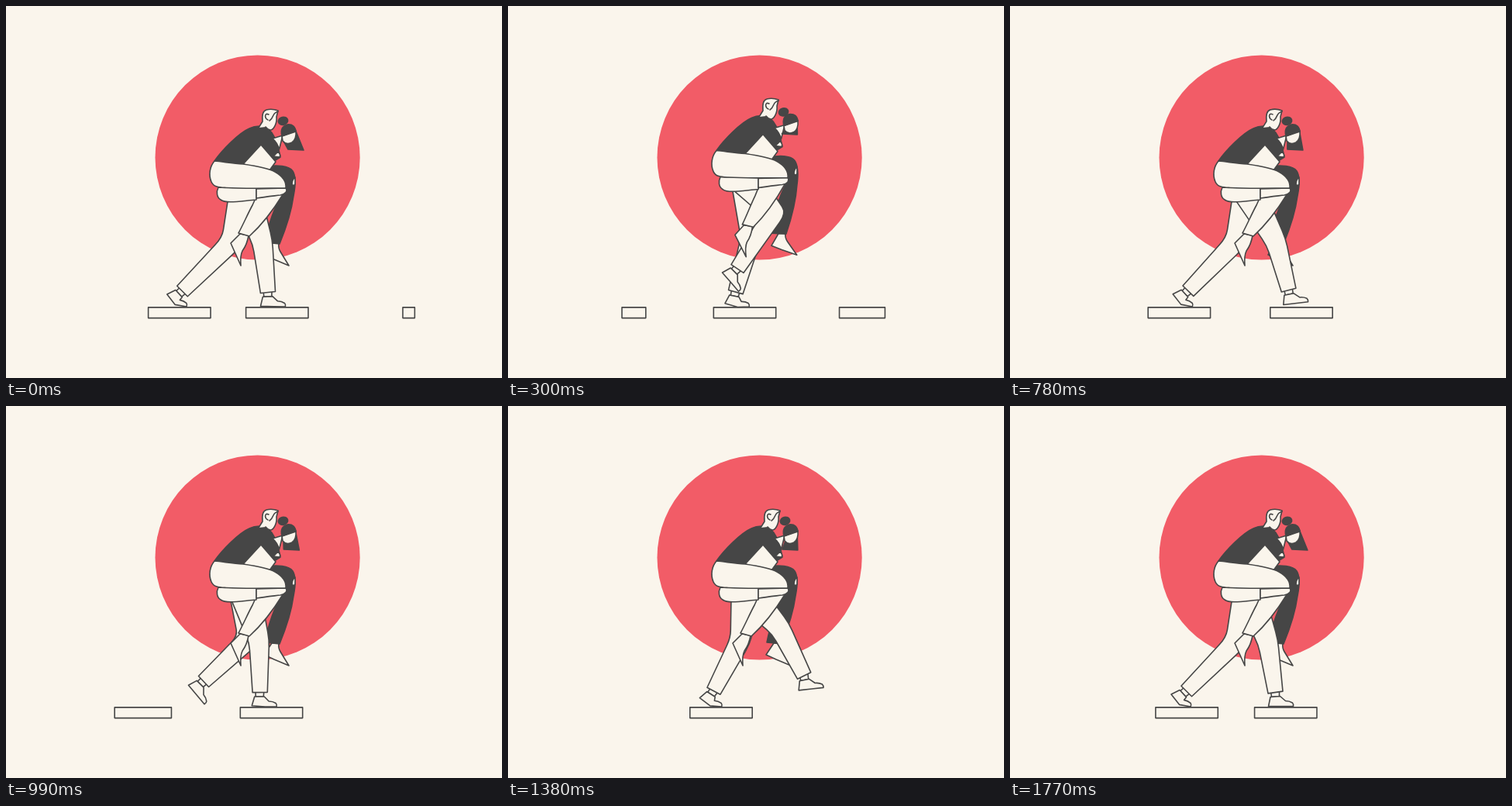
Animation of 640 by 480 pixels, one loop 1.8 s. Source, as an HTML page with a canvas:

```html
<!DOCTYPE html>
<html lang="en">
<head>
<meta charset="utf-8">
<title>Piggyback walk</title>
<style>
html, body { margin: 0; width: 100%; height: 100%; overflow: hidden; background: #faf5ec; }
canvas { display: block; width: 640px; height: 480px; }
</style>
</head>
<body>
<canvas id="stage" width="640" height="480"></canvas>
<script>
const ctx = document.getElementById('stage').getContext('2d');
const LOOP = 1800, STEP = 30, GROUND = 388, SLAB = 80.4;
const CREAM = '#faf5ec', RED = '#f25c67', DARK = '#464646';
const RAD = Math.PI / 180, TAU = Math.PI * 2;

function slope(keys, i, c) {
  const rate = (a, b) => (b[c] - a[c]) / (b[0] - a[0]);
  const p = keys[i - 1], k = keys[i], n = keys[i + 1];
  if (!p) return rate(k, n);
  if (!n) return rate(p, k);
  const a = rate(p, k), b = rate(k, n);
  if (a * b <= 0) return 0;
  const limit = 3 * Math.min(Math.abs(a), Math.abs(b));
  return Math.sign(a) * Math.min(Math.abs(rate(p, n)), limit);
}

// Smooth interpolation without overshoot; keys are [time, ...values].
function sample(keys, t) {
  let i = 0;
  while (i < keys.length - 2 && t >= keys[i + 1][0]) i++;
  const a = keys[i], b = keys[i + 1], d = b[0] - a[0], u = (t - a[0]) / d;
  const h = u * u * (3 - 2 * u);
  return a.slice(1).map((v, n) => {
    const c = n + 1;
    return v + (b[c] - v) * h + d * u * (1 - u) *
      ((1 - u) * slope(keys, i, c) - u * slope(keys, i + 1, c));
  });
}

// One stride: time, knee x and y, ankle x and y, foot angle.
const stride = [
  [0, 290.5, 305, 227.5, 368, 52],
  [110, 312, 302, 255, 355.5, 50],
  [300, 343, 268, 296, 339, 49],
  [570, 352, 296, 394.5, 352.5, -17],
  [650, 352, 303, 380.5, 359.5, -15],
  [890, 333, 305, 342.5, 369.5, 0],
  [1225, 313, 300, 293, 369, 17],
  [1510, 292, 305, 245.5, 367, 50]
];
const again = (k, d) => [k[0] + d, ...k.slice(1)];
const gait = [again(stride[stride.length - 1], -LOOP), ...stride,
              ...stride.slice(0, 2).map(k => again(k, LOOP))];
const FAR_LAG = 880;

// Each slab glides left, growing on entry and shrinking on exit.
const slabs = [
  { start: -352, grow: 300, end: 1247,
    path: [[-352, 431], [0, 349.8], [300, 305.5], [570, 257.2], [990, 176.8], [1247, 113.5]] },
  { start: -22, grow: 600, end: 2208,
    path: [[-30, 526], [300, 457], [570, 410], [1230, 303.3], [1530, 248.8], [1800, 223.8], [2208, 139]] }
];

const bob = (t, size, span) => t < span ? -size * (1 - Math.cos(TAU * t / span)) / 2 : 0;

function paint(path, fill) {
  const p = typeof path === 'string' ? new Path2D(path) : path;
  if (fill) { ctx.fillStyle = fill; ctx.fill(p); }
  ctx.stroke(p);
}

function poly(points, fill) {
  const p = new Path2D();
  points.forEach(q => p.lineTo(...q));
  p.closePath();
  paint(p, fill);
}

function moved(x, y, draw) {
  ctx.save();
  ctx.translate(x, y);
  draw();
  ctx.restore();
}

function turned(x, y, deg, draw) {
  ctx.save();
  ctx.translate(x, y);
  ctx.rotate(deg * RAD);
  ctx.translate(-x, -y);
  draw();
  ctx.restore();
}

function sun() {
  ctx.fillStyle = RED;
  ctx.beginPath();
  ctx.arc(324.6, 195.5, 132.1, 0, TAU);
  ctx.fill();
}

function slab({ start, grow, end, path }, t) {
  if (t <= start || t >= end) return;
  const w = SLAB * Math.min(1, Math.sqrt((t - start) / grow), (end - t) / 282);
  const l = sample(path, t)[0] - w / 2, r = l + w;
  poly([[l, 388.9], [r, 388.9], [r, 402.6], [l, 402.6]], CREAM);
}

function foot(x, y, deg) {
  const frame = (ox, oy, a) => (u, v) =>
    [ox + u * Math.cos(a) - v * Math.sin(a), oy + u * Math.sin(a) + v * Math.cos(a)];
  const at = frame(x, y, deg * RAD), ball = at(8, 18);
  // The toes flatten when they reach the ground.
  const room = Math.asin(Math.max(-1, Math.min(1, (GROUND - ball[1]) / 15)));
  const toe = frame(...ball, Math.min(deg * RAD, room));
  poly([at(-6, -2), at(-5, 6), at(5, 5), at(5, -2)], CREAM);
  const p = new Path2D();
  p.moveTo(...at(-6.5, 6));
  p.lineTo(...at(-9, 18));
  p.lineTo(...ball);
  p.lineTo(...toe(15, 0));
  p.quadraticCurveTo(...toe(15.5, -3), ...toe(14, -4.5));
  p.quadraticCurveTo(...toe(10, -7), ...toe(5, -7));
  p.lineTo(...at(6, 5));
  p.closePath();
  paint(p, CREAM);
}

function leg(t, lift) {
  const [kx, ky, ax, ay, deg] = sample(gait, t);
  const hx = 308, hy = 240 + lift;
  const thigh = Math.atan2(ky - hy, kx - hx), calf = Math.atan2(ay - ky, ax - kx);
  const bend = (calf - thigh) / 2;
  const off = (x, y, a, w) => [x - Math.sin(a) * w, y + Math.cos(a) * w];
  const mix = (a, b, u) => [a[0] + (b[0] - a[0]) * u, a[1] + (b[1] - a[1]) * u];
  foot(ax, ay, deg);
  const p = new Path2D();
  for (const s of [1, -1]) {
    const edge = [off(hx, hy, thigh, 20 * s), off(kx, ky, thigh + bend, 12.9 * s / Math.cos(bend)),
                  off(ax, ay, calf, 9.6 * s)];
    if (s < 0) edge.reverse();
    const [a, k, b] = edge;
    p.lineTo(...a);
    p.lineTo(...mix(k, a, 0.15));
    p.quadraticCurveTo(...k, ...mix(k, b, 0.15));
    p.lineTo(...b);
  }
  p.closePath();
  paint(p, CREAM);
}

function darkLeg(swing) {
  turned(364, 216, -3.6 * swing, () => {
    paint('M343 306L333 321L346 327L365 335L354 317Q351 312 352 306Z', CREAM);
    paint('M336 207C350 205 365 206 370 213C375 221 373 235 371 245C368 268 360 290 353 307' +
          'L334 305C338 285 345 262 356 244L350 222Z', DARK);
  });
  paint('M373 221Q369 224 369 230Q371 233 373 230Z', CREAM);
}

function shin(swing) {
  turned(355, 240, -2.4 * swing, () => {
    paint('M302 294L290 306L303 335Q302 322 305 316Q311 308 313 296Z', CREAM);
    paint('M358 242C350 255 334 279 314 297L300 293C306 282 312 268 318 257L323 246Z', CREAM);
  });
}

function torso() {
  paint('M274 234C271 240 272 247 277 250C284 255 300 252 323 250L323 235Z', CREAM);
  paint('M323 236L323 248C335 246 346 245 354 244C360 243 364 239 361 235Z', CREAM);
  paint('M269 200C278 187 300 164 314 158C322 154 332 154 338 158C346 165 350 176 352 186' +
        'L354 195L346 200L340 211L306 204Z', DARK);
  paint('M329 179L306 204L340 212L348 201Z', CREAM);
  paint('M344 171L357 167L352.5 185Q350 176 344 171Z', CREAM);
  paint('M345 194L351 188Q355 192 353 195Z', CREAM);
  paint('M269 200C263 207 261 218 265 227C268 234 276 234 284 234.5C310 236 340 235 361 235' +
        'C362 226 356 219 347 214C338 209 320 206 306 204C292 203 280 201 269 200Z', CREAM);
}

function frontHead(x, y) {
  poly([[373, 159], [x, y], [x - 20, y - 1], [358, 174]], DARK);
  paint('M356 168L374 161Q375 172 369 176Q362 180 357 174Z', CREAM);
  paint('M356 168Q353 156 363 153Q373 152 374 162Z', DARK);
}

function backHead() {
  paint('M326 157L331 149C330 139 332 135 336 134Q343 132 351 135Q350 139 349 143' +
        'C350 152 345 160 341 160Q337 159 335 156', CREAM);
  paint('M351 136Q346 138 345 141Q343 146 340 148');
  paint('M339 140Q335 138 334.5 142Q335 146 338 147');
}

function draw(t) {
  ctx.fillStyle = CREAM;
  ctx.fillRect(0, 0, 640, 480);
  ctx.strokeStyle = DARK;
  ctx.lineWidth = 1.6;
  ctx.lineJoin = ctx.lineCap = 'round';

  const lift = bob(t, 15.2, 770), headLift = bob(t, 16.4, 800);
  const swing = -lift / 13, lean = headLift / 7, turn = TAU * t / LOOP;
  sun();
  for (const s of slabs) for (const d of [-LOOP, 0, LOOP]) slab(s, t + d);
  moved(0, lift, () => darkLeg(swing));
  leg((t + LOOP - FAR_LAG) % LOOP, lift);
  leg(t, lift);
  moved(0, lift, () => { shin(swing); torso(); });
  moved(lean, headLift, backHead);
  moved(0, lift, () => {
    const tipX = 377.5 + 4 * Math.cos(2 * turn) + 2.5 * Math.cos(turn) + lift / 4;
    frontHead(tipX, 186 + lift / 2);
  });
  moved(lean, lift - lean, () => {
    const bun = new Path2D();
    bun.ellipse(357.5, 148.3, 6.2, 5, -0.25, 0, TAU);
    paint(bun, DARK);
  });
}

const start = performance.now();
function tick() {
  const t = (performance.now() - start) % LOOP;
  draw(Math.floor(t / STEP) * STEP);
  requestAnimationFrame(tick);
}
tick();
</script>
</body>
</html>
```
